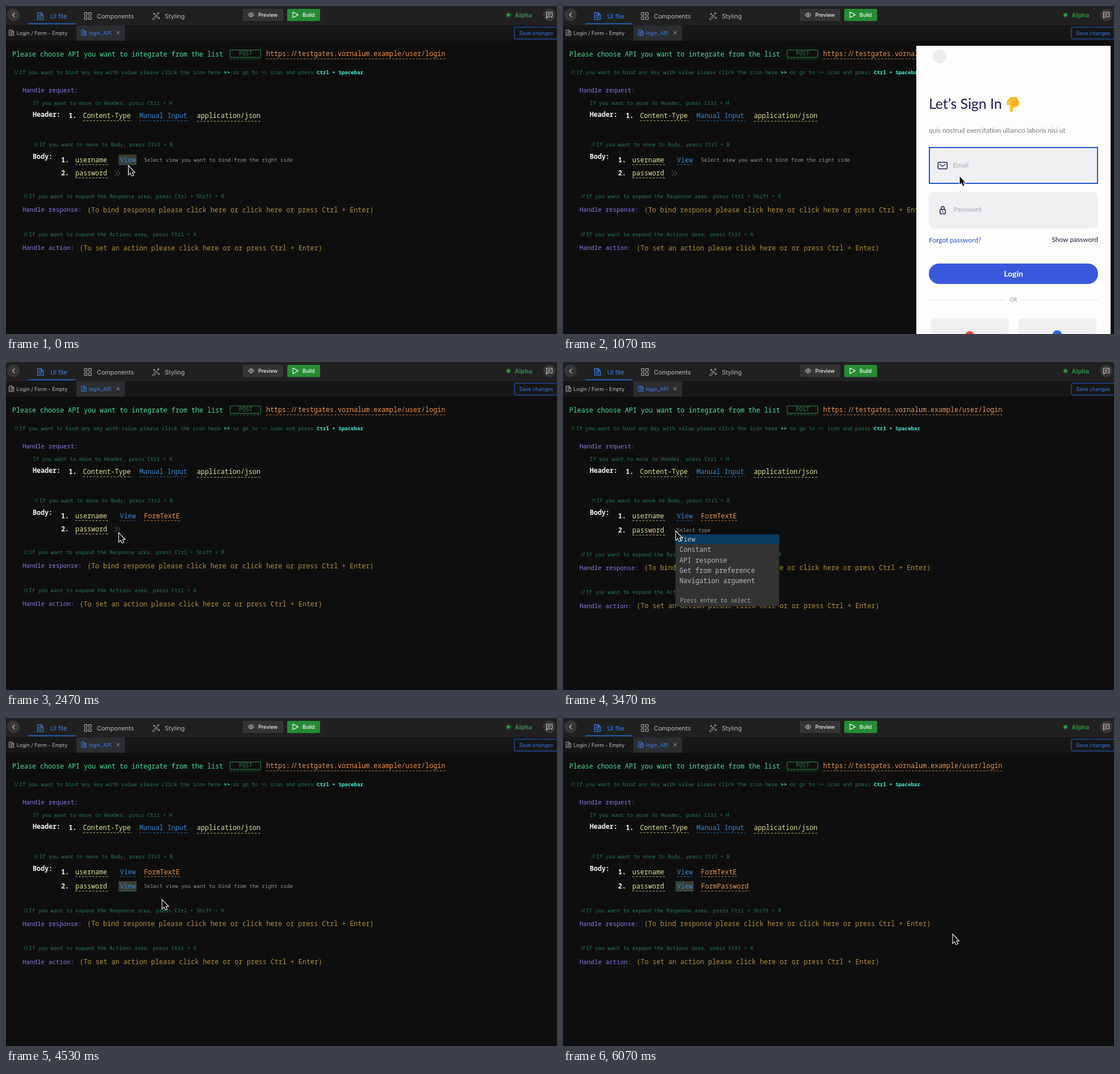
An HTML page with a canvas for the animation above (6870 ms loop, 970 px wide and 577 px high).

```html
<!DOCTYPE html>
<html lang="en">
<head>
<meta charset="utf-8">
<title>API binding</title>
<style>
html, body { margin: 0; width: 100%; height: 100%; overflow: hidden; background: #0e0e0e; }
canvas { display: block; width: 970px; height: 577px; }
</style>
</head>
<body>
<canvas id="stage" width="970" height="577"></canvas>
<script>
const g = document.getElementById('stage').getContext('2d');
const LOOP = 6870;
const MONO = '"Noto Sans Mono", "DejaVu Sans Mono", monospace';
const UI = 'Inter, Roboto, sans-serif';
const FORM = 'Lato, "Open Sans", sans-serif';
const BIG = 11.68, MID = 9.9, SMALL = 9.1;
const C = {
  green: '#4ade9a', note: '#267a57', aqua: '#45f0d6', purple: '#8b78e6', key: '#e3e09a',
  blue: '#3584d8', orange: '#ee944c', gold: '#b48f3b', hint: '#969696', white: '#f5f5f5',
  ui: '#b9b9b9', link: '#3b82f0', navy: '#1c1d4f'
};

// times of the hard changes
const OPEN1 = 400, SHUT1 = 1200, BLUR1 = 1730, MENU = 3400, PICK = 4070,
      OPEN2 = 4670, SHUT2 = 5470, BIND2 = 5530;
// pointer stops: time, x, y
const STOPS = [
  [0, 216, 282], [70, 216, 282], [800, 698.5, 300], [1200, 698.5, 300], [2330, 199, 301.5],
  [3330, 199, 301.5], [3400, 199, 298.5], [3530, 199, 298.5], [4000, 216, 312],
  [4360, 216, 312], [5130, 686.5, 381.5], [LOOP, 686.5, 381.5]
];

function pointer(t) {
  const i = Math.max(1, STOPS.findIndex(s => s[0] > t));
  const [t0, x0, y0] = STOPS[i - 1], [t1, x1, y1] = STOPS[i];
  const u = (t - t0) / (t1 - t0), e = u * u * (3 - 2 * u);
  return [x0 + (x1 - x0) * e, y0 + (y1 - y0) * e];
}

function rect(x, y, w, h, fill, r = 0) {
  g.fillStyle = fill;
  g.beginPath();
  g.roundRect(x, y, w, h, r);
  g.fill();
}
function frame(x, y, w, h, color, r = 0, width = 1) {
  g.strokeStyle = color;
  g.lineWidth = width;
  g.beginPath();
  g.roundRect(x, y, w, h, r);
  g.stroke();
}
function disc(x, y, r, fill) {
  g.fillStyle = fill;
  g.beginPath();
  g.arc(x, y, r, 0, 7);
  g.fill();
}
function stroke(d, color, x = 0, y = 0, width = 1.1) {
  g.save();
  g.translate(x, y);
  g.strokeStyle = color;
  g.lineWidth = width;
  g.lineCap = g.lineJoin = 'round';
  g.stroke(new Path2D(d));
  g.restore();
}
function text(s, x, y, size, color, font = UI, weight = 400, align = 'left') {
  g.font = `${weight} ${size}px ${font}`;
  g.fillStyle = color;
  g.textAlign = align;
  g.fillText(s, x, y);
}
// code text centred on y; double slashes sit close together; returns the end x
function code(s, x, y, color, size = BIG, weight = 400) {
  const base = y + size * 0.345;
  for (const part of s.split(/(\/\/)/)) {
    text(part === '//' ? '' : part, x, base, size, color, MONO, weight);
    const w = g.measureText(part).width;
    if (part === '//') {
      g.fillText('/', x + size * 0.1, base);
      g.fillText('/', x + w / 2 - size * 0.1, base);
    }
    x += w;
  }
  return x;
}
function dashes(x0, x1, y, color) {
  g.save();
  g.setLineDash([3.5, 2.5]);
  g.strokeStyle = color;
  g.globalAlpha = 0.8;
  g.lineWidth = 1;
  g.beginPath();
  g.moveTo(x0, y);
  g.lineTo(x1, y);
  g.stroke();
  g.restore();
}
function slot(s, x, y, color, drop = 8.5) {
  const end = code(s, x, y, color);
  dashes(x, end + 1.5, y + drop, color);
}
function view(y, lit) {
  if (lit) rect(198, y - 9, 32, 18, '#3c3d31');
  slot('View', 200.5, y, C.blue);
}

function fileIcon(x, y, k, color) {
  g.save();
  g.translate(x, y);
  g.scale(k, k);
  stroke('M1 1H7L11 5V13H1Z M7 1V5H11 M3.5 7H8.5 M3.5 10H8.5 M3.5 4.5H5', color, 0, 0, 1.2);
  g.restore();
}

function topBar() {
  rect(0, 0, 970, 32, '#202020');
  rect(0, 32, 970, 29, '#171717');
  rect(0, 32, 970, 1, '#292929');
  disc(13, 15.5, 11, '#363636');
  stroke('M15 12L11.5 15.5L15 19', '#c8c8c8');

  fileIcon(54.5, 10.5, 1.02, C.link);
  text('UI file', 78, 21.8, 10.8, C.link);
  rect(39, 30.5, 83, 1.5, '#2468d8');
  for (const [x, y] of [[138, 11.5], [145.5, 11.5], [138, 19], [145.5, 19]])
    frame(x, y, 4.7, 4.7, C.ui);
  text('Components', 160, 21.8, 10.8, C.ui);
  stroke('M1 12L8 5L10 7L3 14Z M6.5 6.5L8.5 8.5 M4 2V5M2.5 3.5H5.5 M11 1V4M9.5 2.5H12.5 M12 9V12M10.5 10.5H13.5',
    C.ui, 257, 10.5, 1);
  text('Styling', 279.5, 21.8, 10.8, C.ui);

  rect(417, 5, 71, 21.5, '#343434', 2.5);
  stroke('M0 4Q5 -3.5 10 4Q5 11.5 0 4Z', '#e8e8e8', 426.5, 11.5, 1);
  stroke('M6.5 4A1.5 1.5 0 1 1 3.5 4A1.5 1.5 0 1 1 6.5 4', '#e8e8e8', 426.5, 11.5, 1);
  text('Preview', 444, 19.2, 9, '#f0f0f0', UI, 500);
  rect(495, 5, 58, 21.5, '#258c34', 2.5);
  stroke('M505 10.5V20.5L514.5 15.5Z', '#fff');
  text('Build', 522, 19.2, 9, '#fff', UI, 500);

  disc(884.5, 15.8, 5, '#1d3b22');
  disc(884.5, 15.8, 3, '#2f9a42');
  text('Alpha', 895.5, 19.8, 11, '#32964a', UI, 600);
  disc(956.5, 15.5, 11, '#363636');
  stroke('M1 1H11V9H4L1 11Z M3.5 4H8.5 M3.5 6.3H6.5', '#d0d0d0', 950.5, 10);

  fileIcon(5, 41.5, 0.8, C.ui);
  text('Login / Form - Empty', 18.5, 50.8, 9, '#bdbdbd');
  rect(124, 34, 85.5, 27, '#2b2d30');
  fileIcon(132.5, 41.5, 0.8, C.link);
  text('login_API', 146, 50.8, 9, C.link);
  stroke('M195 44.7L199.6 49.3M199.6 44.7L195 49.3', '#aaa', 0, 0, 1);
  frame(895, 37.2, 90, 20.8, '#2565d6', 2.5);
  text('Save changes', 903.5, 51, 9, '#3478ea');
}

function editor(t, panel) {
  code('Please choose API you want to integrate from the list', 11, 85.2, C.green);
  frame(394.5, 77.3, 54, 13, '#2f8f52', 1.5);
  code('POST', 410, 84, '#2f7d4c', MID);
  dashes(394, 449, 93, '#2f8f52');
  slot('https://testgates.vornalum.example/user/login', 458, 84, C.orange, 9);

  let x = code('//If you want to bind any key with value please click the icon here ', 12.3, 117, C.note, SMALL);
  x = code('>> ', x, 117, C.aqua, SMALL, 700);
  x = code('or go to >> icon and press ', x, 117, C.note, SMALL);
  code('Ctrl + Spacebar', x, 117, C.aqua, SMALL, 700);

  code('Handle request:', 29, 148, C.purple, 10.88);
  code('If you want to move to Header, press Ctrl + H', 47, 171, C.note, SMALL);
  code('Header:', 47, 191, C.white, BIG, 700);
  code('1.', 110.5, 193.3, C.white, BIG, 700);
  slot('Content-Type', 135.5, 193.3, C.key);
  slot('Manual Input', 235, 193.3, C.blue);
  slot('application/json', 336, 193.3, C.key, 9.5);

  code('//If you want to move to Body, press Ctrl + B', 48, 244.3, C.note, SMALL);
  code('Body:', 47, 265, C.white, BIG, 700);
  code('1.', 97, 270.5, C.white, BIG, 700);
  slot('username', 122, 270.5, C.key);
  view(270.5, t < OPEN1 || (t >= SHUT1 && t < BLUR1));
  const ask = 'Select view you want to bind from the right side';
  if (t < SHUT1) code(ask, 243, 270.5, C.hint, SMALL);
  else slot('FormTextE', 243, 270.5, C.orange);

  const moved = t >= MENU, row = moved ? 296 : 294, dy = moved ? 3.6 : 0;
  code('2.', 97, row, C.white, BIG, 700);
  slot('password', 122, row, C.key);
  if (!moved) stroke('M191.5 290L196 294.3L191.5 298.6M196.5 290L201 294.3L196.5 298.6', '#6b6b6b', 0, 0, 1);
  else if (t < PICK) code('Select type', 200, 295.5, C.hint, SMALL);
  else {
    view(296, !panel);
    if (t < BIND2) code(ask, 243, 296, C.hint, SMALL);
    else slot('FormPassword', 243, 296, C.orange);
  }

  code('//If you want to expand the Response area, press Ctrl + Shift + R', 29.5, 335 + dy, C.note, SMALL);
  code('Handle response:', 29, 358.7 + dy, C.purple, 10.88);
  code('(To bind response please click here or click here or press Ctrl + Enter)', 143, 358.7 + dy, C.gold);
  code('//If you want to expand the Actions area, press Ctrl + A', 29.5, 401.4 + dy, C.note, SMALL);
  code('Handle action:', 29, 425.6 + dy, C.purple, 10.88);
  code('(To set an action please click here or or press Ctrl + Enter)', 129.5, 425.6 + dy, C.gold);
}

function menu() {
  rect(198, 303.5, 182.5, 126.5, '#333');
  rect(198, 303.5, 182.5, 16.5, '#0a3c60');
  ['View', 'Constant', 'API response', 'Get from preference', 'Navigation argument']
    .forEach((s, i) => code(s, 205, 312 + i * 18.25, '#b9b9b9'));
  code('Press enter to select', 206, 419.5, '#a9a9a9', MID);
}

function hand(x, y) {
  const skin = '#fbbd2c', fold = '#d98a14';
  rect(x + 3.5, y, 16, 14, skin, 5);
  rect(x + 5, y + 6, 5.5, 20, skin, 2.7);
  rect(x + 10, y + 9, 4.6, 10, skin, 2.3);
  rect(x + 14, y + 8, 4.2, 9.5, skin, 2.1);
  rect(x + 17.5, y + 6, 4, 9.5, skin, 2);
  stroke('M3.5 5Q0 9 1.5 13Q4 13 6 9', skin, x, y, 3);
  stroke('M10.4 10V17M14.3 10V16M17.8 9V14M10 9Q14 6 18 7', fold, x, y, 0.8);
}

function field(y, h, label, x, on) {
  rect(644, y, 298, h, '#f0f0f2', on ? 0 : 10);
  if (on) frame(645, y + 1, 296, h - 2, '#1c57cf', 0, 2);
  text(label, x, y + h / 2 + 3, 11.7, '#a3a4af', FORM);
}

function form([px, py]) {
  rect(622, 70, 342, 507, '#fdfdfd');
  disc(663, 89, 12, '#ececed');
  text('Let’s Sign In', 644, 181, 24.8, C.navy, FORM);
  hand(781.5, 160);
  text('quis nostrud exercitation ullamco laboris nisi ut', 644, 223, 11.7, '#74758a', FORM);

  const over = (y, h) => px > 644 && px < 942 && py > y && py < y + h;
  field(248, 65, 'Email', 686.5, over(248, 65));
  frame(660.2, 275, 16, 11.5, C.navy, 2, 1.5);
  stroke('M663.5 278.5L668.2 282L673 278.5', C.navy, 0, 0, 1.4);
  field(327, 64.5, 'Password', 687.5, over(327, 64.5));
  frame(663.7, 358, 9.6, 7.5, C.navy, 1.5, 1.5);
  stroke('M665.7 358V355.5A2.8 2.8 0 0 1 671.3 355.5V358M668.5 361V362.5', C.navy, 0, 0, 1.4);

  text('Forgot password?', 644, 415.5, 11.9, '#264fc4', FORM);
  text('Show password', 942, 414.8, 11.9, '#1a1b3c', FORM, 400, 'right');
  rect(644, 453, 298, 36, '#3a59da', 18);
  text('Login', 793, 475.5, 14, '#fff', FORM, 700, 'center');
  rect(644, 517, 133.5, 1, '#dedee3');
  rect(809, 517, 133, 1, '#dedee3');
  text('OR', 793, 520.3, 8.8, '#83849a', FORM, 400, 'center');
  rect(647.5, 549, 137, 40, '#f0f0f2', 5);
  rect(802, 549, 137, 40, '#f0f0f2', 5);
  disc(716, 580, 8, '#e5483a');
  disc(870, 579, 8.5, '#2468e0');
}

function arrow([x, y]) {
  const p = new Path2D('M0 0V14L3.2 11L5.6 16.4L7.9 15.4L5.5 10.2H9.6Z');
  g.save();
  g.translate(x, y);
  g.lineJoin = 'miter';
  g.lineWidth = 2.2;
  g.strokeStyle = '#fff';
  g.stroke(p);
  g.fillStyle = '#000';
  g.fill(p);
  g.restore();
}

function draw(t) {
  const panel = (t >= OPEN1 && t < SHUT1) || (t >= OPEN2 && t < SHUT2);
  const at = pointer(t);
  rect(0, 0, 970, 577, '#0e0e0e');
  editor(t, panel);
  topBar();
  if (t >= MENU && t < PICK) menu();
  if (panel) form(at);
  arrow(at);
}

const start = performance.now();
function tick() {
  draw((performance.now() - start) % LOOP);
  requestAnimationFrame(tick);
}
tick();
</script>
</body>
</html>
```
